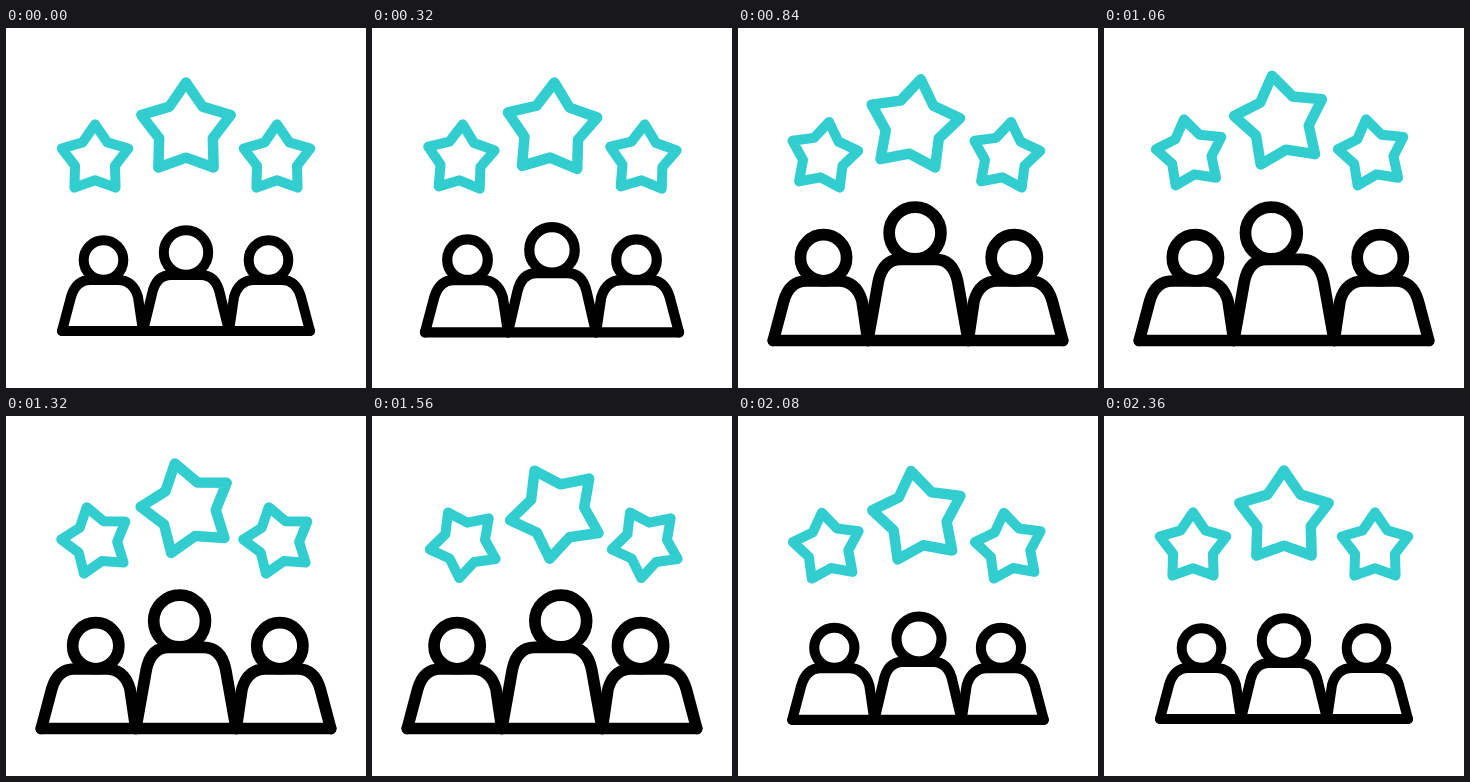
Write an HTML page that moves like this. It is 360x360 px and loops after 2400 ms.

```html
<!DOCTYPE html>
<html lang="en">
<head>
<meta charset="utf-8">
<title>Team rating</title>
<style>
  html, body { margin: 0; height: 100%; overflow: hidden; background: #fff; }
  svg { display: block; width: 100%; height: 100%; fill: none; stroke-linejoin: round; stroke-linecap: round; }
</style>
</head>
<body>
<svg viewBox="0 0 360 360">
  <g id="stars" stroke="#32cecf"></g>
  <g id="team" stroke="#000" stroke-width="10">
    <path d="M56 303H304"/>
    <path id="side" d="M56 303L65 269Q70 252 84 252H112Q127 252 132 269L137 303"/>
    <use href="#side" transform="matrix(-1 0 0 1 360 0)"/>
    <path id="body"/>
    <circle id="left" cy="232" r="19.8"/>
    <circle id="right" cy="232" r="19.8"/>
    <circle id="middle" cx="180" r="22.2"/>
  </g>
</svg>
<script>
const LOOP = 2400;
const $ = id => document.getElementById(id);
const set = (id, attrs) => {
  for (const key in attrs) $(id).setAttribute(key, attrs[key]);
};

// Smoothly eased value through [time, value] keys
function track(t, keys) {
  if (t <= keys[0][0]) return keys[0][1];
  for (let i = 1; i < keys.length; i++) {
    const [t0, a] = keys[i - 1], [t1, b] = keys[i];
    if (t < t1) {
      const u = (t - t0) / (t1 - t0);
      return a + (b - a) * u * u * (3 - 2 * u);
    }
  }
  return keys[keys.length - 1][1];
}

// Each star sits slightly below its pivot, so it swings as it turns
function addStar(x, y, radius, width) {
  const points = Array.from({ length: 10 }, (_, i) => {
    const r = i % 2 ? radius * 0.6 : radius;
    const a = (i * 36 - 90) * Math.PI / 180;
    return [r * Math.cos(a), r * Math.sin(a) + radius * 0.095];
  });
  const star = document.createElementNS("http://www.w3.org/2000/svg", "polygon");
  star.setAttribute("points", points.join(" "));
  star.setAttribute("stroke-width", width);
  $("stars").append(star);
  return angle => star.setAttribute("transform", `translate(${x} ${y}) rotate(${angle})`);
}

const stars = [addStar(89, 128, 35, 10), addStar(180, 97, 47, 10.5), addStar(271, 128, 35, 10)];

function draw(t) {
  const angle = track(t, [[205, 0], [2280, 360]]);
  stars.forEach(turn => turn(angle));

  const grow = track(t, [[200, 0], [705, 1], [1720, 1], [2160, 0]]);
  const lean = (a, b) => track(t, [[720, 0], [1120, a], [1720, b], [2160, 0]]);
  const rise = 13.6 * grow;
  const top = 247 - rise, hip = 266 - rise;

  set("team", { transform: `translate(180 246) scale(${1 + 0.167 * grow}) translate(-180 -246)` });
  set("body", { d: `M137 303L146 ${hip}Q150 ${top} 165 ${top}H195Q210 ${top} 214 ${hip}L223 303` });
  set("left", { cx: 97.5 + lean(7, 0) });
  set("right", { cx: 262.5 + lean(0, -8) });
  set("middle", { cx: 180 + lean(-11.5, 11.5), cy: 224.5 - rise });
}

const start = performance.now();
function frame() {
  draw((performance.now() - start) % LOOP);
  requestAnimationFrame(frame);
}
frame();
</script>
</body>
</html>
```
